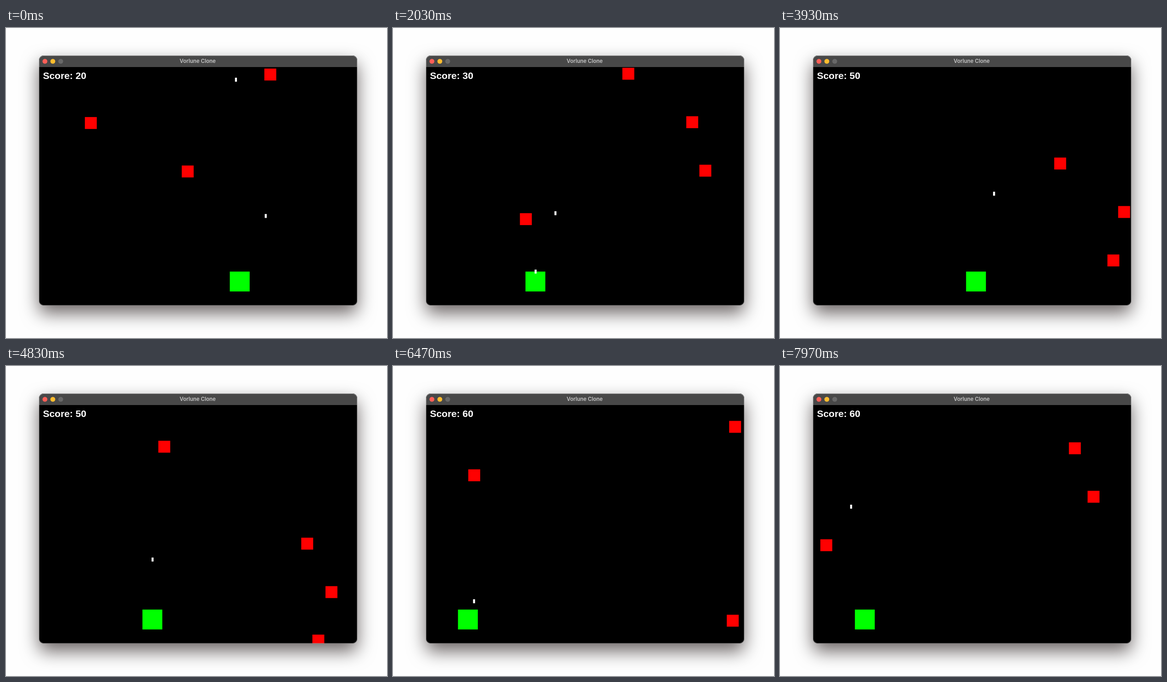
These frames come from a looping animation (830 px wide and 675 px high, 8 s). An HTML page with a canvas:

```html
<!DOCTYPE html>
<html lang="en">
<head>
<meta charset="utf-8">
<title>Vorlune Clone</title>
<style>
  html, body { margin: 0; width: 100%; height: 100%; overflow: hidden; background: #fefefe; }
  .window {
    position: absolute; left: 72px; top: 60px; width: 693px; height: 544px;
    border-radius: 10px; background: #000;
    box-shadow: 0 0 1px rgba(0, 0, 0, .6), 0 17px 38px rgba(12, 0, 0, .6);
  }
  .bar {
    height: 25px; border-radius: 10px 10px 0 0; background: #484848; color: #c6c6c6;
    font: 600 11.5px/25px Inter, sans-serif; text-align: center; text-indent: -2px;
  }
  .frame {
    background: none;
    box-shadow: inset 0 0 0 1px rgba(255, 255, 255, .25), inset 0 1px 0 rgba(255, 255, 255, .1);
  }
  canvas { position: absolute; left: 0; top: 0; }
</style>
</head>
<body>
<div class="window"><div class="bar">Vorlune Clone</div></div>
<canvas width="830" height="675"></canvas>
<div class="window frame"></div>
<script>
const ctx = document.querySelector('canvas').getContext('2d');
const LOOP = 8000, SCALE = 0.865, LEFT = 73.2, TOP = 84.9;
const WALL = 770, SPAWN_GAP = 61, FIRST_SPAWN = -124, LAST_TICK = 480;
const PLAYER_SPEED = 5, PLAYER_Y = 515, FIRE = true;

// Where the player has to be at a tick; it sets off just in time and may shoot there
const stops = [
  [-69, 469, FIRE], [-20, 544, FIRE], [12, 419, FIRE], [44, 284, FIRE], [100, 299, FIRE],
  [121, 249, FIRE], [168, 364, FIRE], [181, 429], [206, 429, FIRE], [234, 384],
  [269, 259, FIRE], [342, 219], [381, 94, FIRE], [385, 74], [425, 99], [435, 69, FIRE], [472, 104]
].map(([tick, x, fire]) => ({ tick, x, fire }));

const bullets = stops.filter(stop => stop.fire)
  .map(({ tick, x }) => ({ born: tick, x: x + 23, end: Infinity }));

// Starting columns, one per spawn; a minus sign means drifting left
const enemies = [-482, 51, 564, 592, 492, 332, -344, -186, 742, -690].map((column, i) => ({
  born: FIRST_SPAWN + i * SPAWN_GAP, x: Math.abs(column), dir: Math.sign(column), end: Infinity
}));

function playerX(tick) {
  const i = stops.findIndex(stop => stop.tick >= tick);
  if (i < 0) return stops[stops.length - 1].x;
  const { tick: due, x } = stops[i];
  const way = stops[i - 1].x - x;
  return x + Math.sign(way) * Math.min(Math.abs(way), PLAYER_SPEED * (due - tick));
}

function enemyBox({ born, x, dir }, tick) {
  const age = tick - born;
  return { x: WALL - Math.abs(WALL - x - dir * age), y: 2 * age, w: 30, h: 30 };
}

function bulletBox({ born, x }, tick) {
  return { x, y: PLAYER_Y - 5 - 7 * (tick - born), w: 5, h: 10 };
}

const alive = (thing, tick) => tick >= thing.born && tick < thing.end;

const overlap = (a, b) =>
  a.x < b.x + b.w && b.x < a.x + a.w && a.y < b.y + b.h && b.y < a.y + a.h;

// Play the game through once to find the hits
for (let tick = FIRST_SPAWN; tick < LAST_TICK; tick++) {
  for (const enemy of enemies) {
    for (const bullet of bullets) {
      if (alive(enemy, tick) && alive(bullet, tick) &&
          overlap(enemyBox(enemy, tick), bulletBox(bullet, tick))) {
        enemy.end = bullet.end = tick;
      }
    }
  }
}

// Pictures last 30, 40 and 30 ms in turn; each is two ticks on, with a tick dropped now and then
function tickAt(ms) {
  const rest = ms % 100;
  const picture = 3 * Math.floor(ms / 100) + (rest >= 30) + (rest >= 70);
  return 2 * picture - Math.trunc((picture - 10) / 38);
}

function fillBox(color, { x, y, w, h }) {
  ctx.fillStyle = color;
  ctx.fillRect(LEFT + x * SCALE, TOP + y * SCALE, w * SCALE, h * SCALE);
}

function drawButtons() {
  ['#ff5f57', '#febc2e', '#686868'].forEach((color, i) => {
    ctx.fillStyle = color;
    ctx.beginPath();
    ctx.arc(84.8 + 17.2 * i, 72.5, 5.3, 0, 2 * Math.PI);
    ctx.fill();
  });
}

function draw(ms) {
  const tick = tickAt(ms);
  ctx.clearRect(0, 0, 830, 675);
  drawButtons();

  ctx.save();
  ctx.beginPath();
  ctx.rect(LEFT, 85, 691.5, 519);
  ctx.clip();
  fillBox('#0f0', { x: playerX(tick), y: PLAYER_Y, w: 50, h: 50 });
  for (const enemy of enemies) if (alive(enemy, tick)) fillBox('#f00', enemyBox(enemy, tick));
  for (const bullet of bullets) if (alive(bullet, tick)) fillBox('#fff', bulletBox(bullet, tick));
  ctx.restore();

  const score = 20 + 10 * enemies.filter(enemy => enemy.end <= tick).length;
  ctx.fillStyle = '#fff';
  ctx.font = 'bold 21px "Liberation Sans", Arial, sans-serif';
  ctx.fillText('Score: ' + score, 80.4, 111);
}

const start = performance.now();
function loop() {
  draw((performance.now() - start) % LOOP);
  requestAnimationFrame(loop);
}
loop();
</script>
</body>
</html>
```
